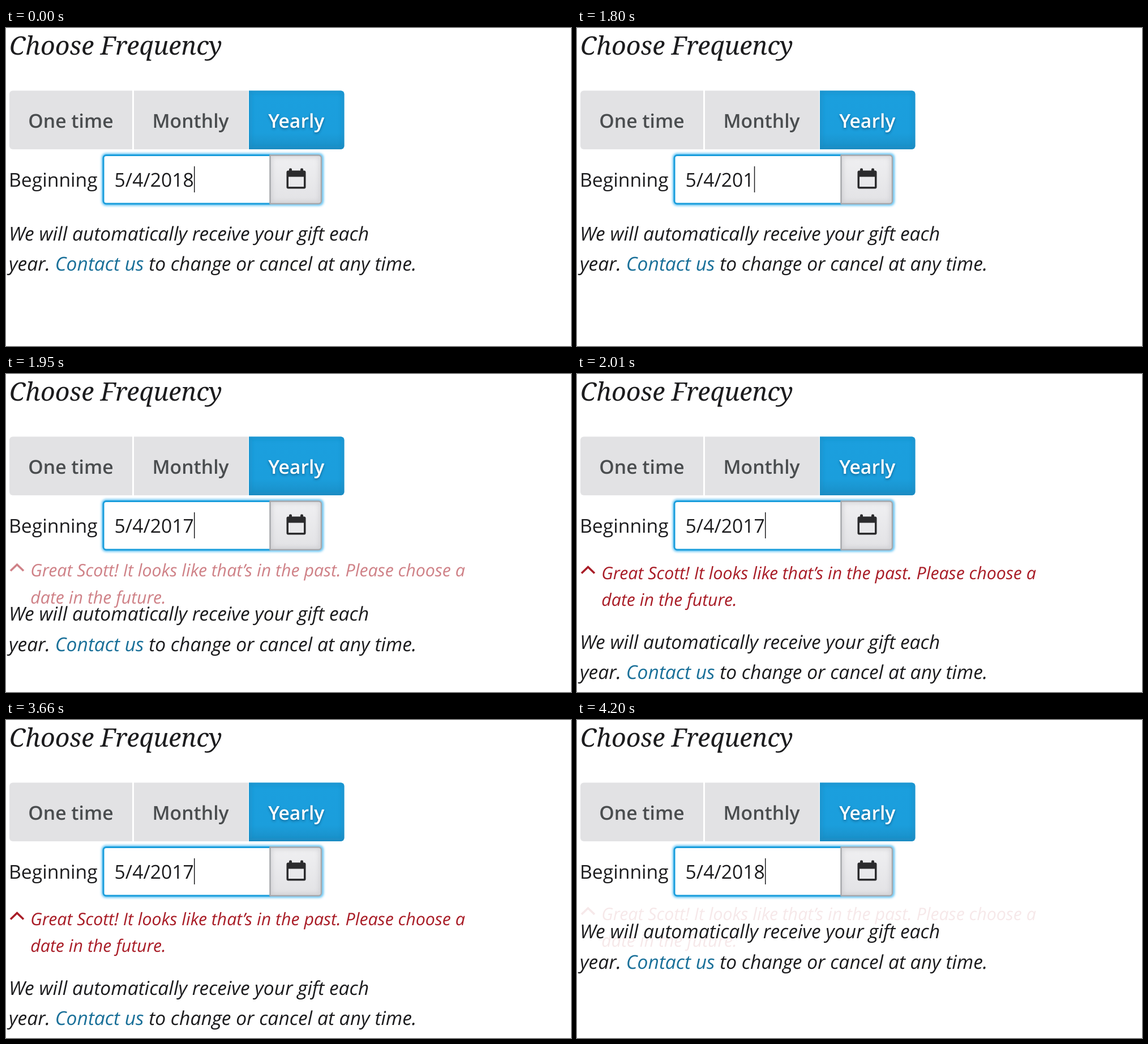
An HTML page for the animation above (4230 ms loop, 998 px wide and 561 px high).

```html
<!DOCTYPE html>
<html lang="en">
<head>
<meta charset="utf-8">
<title>Choose Frequency</title>
<style>
  html, body { margin: 0; width: 100%; height: 100%; overflow: hidden; background: #fff; }
  svg { display: block; width: 998px; height: 561px; }
  text { font: 33.7px "Open Sans", sans-serif; fill: #1c1c1e; white-space: pre; text-rendering: geometricPrecision; }
  .title { font: italic 44.8px "Noto Serif", serif; }
  .label { font-weight: 600; fill: #4a4d4f; }
  .active { fill: #fff; text-shadow: 0 2px 4px rgba(0, 30, 60, .45); }
  .note { font-style: italic; }
  .link { fill: #1a7099; }
  .error text { font-style: italic; font-size: 30.4px; fill: #a91d27; }
  .inset { fill: none; stroke-width: 6; filter: url(#soft); }
</style>
</head>
<body>
<svg viewBox="0 0 998 561">
  <defs>
    <linearGradient id="blue" x2="0" y2="1">
      <stop offset="0" stop-color="#1b9fde"/>
      <stop offset=".72" stop-color="#1b9edc"/>
      <stop offset="1" stop-color="#1a8fc7"/>
    </linearGradient>
    <linearGradient id="silver" x2="0" y2="1">
      <stop offset="0" stop-color="#f0f0f2"/>
      <stop offset="1" stop-color="#e2e2e5"/>
    </linearGradient>
    <filter id="glow" x="-10%" y="-20%" width="120%" height="140%">
      <feGaussianBlur stdDeviation="2"/>
    </filter>
    <filter id="soft" x="-10%" y="-20%" width="120%" height="140%">
      <feGaussianBlur stdDeviation="4"/>
    </filter>
    <path id="yearly" d="M429 110.5h162.500a6 6 0 0 1 6 6V208a6 6 0 0 1-6 6H429z"/>
    <path id="picker" d="M466.500 224.500H552a5 5 0 0 1 5 5v75.500a5 5 0 0 1-5 5h-85.500z"/>
    <clipPath id="inYearly"><use href="#yearly"/></clipPath>
    <clipPath id="inPicker"><use href="#picker"/></clipPath>
  </defs>

  <text class="title" x="6" y="47">Choose Frequency</text>

  <path d="M223 110.5H12a6 6 0 0 0-6 6V208a6 6 0 0 0 6 6h211z" fill="#e2e2e4"/>
  <path d="M226 110.5h202V214H226z" fill="#e2e2e4"/>
  <use href="#yearly" fill="url(#blue)"/>
  <g clip-path="url(#inYearly)"><use href="#yearly" class="inset" stroke="#1a86bb" stroke-opacity=".7"/></g>
  <text class="label" x="39.300" y="175.500">One time</text>
  <text class="label" x="258.500" y="175.500">Monthly</text>
  <text class="label active" x="463.200" y="175.500">Yearly</text>

  <text x="5" y="280">Beginning</text>
  <rect x="171.500" y="223.500" width="387" height="87.500" rx="5" fill="none" stroke="#35b2f0" stroke-width="4" filter="url(#glow)"/>
  <path d="M467 224.500H177a5 5 0 0 0-5 5v75.500a5 5 0 0 0 5 5h290" fill="#fff" stroke="#1b9edc" stroke-width="3"/>
  <use href="#picker" fill="url(#silver)"/>
  <g clip-path="url(#inPicker)"><use href="#picker" class="inset" stroke="#b8b8bd" stroke-opacity=".6"/></g>
  <use href="#picker" fill="none" stroke="#a6a8ac" stroke-width="2.500"/>
  <g fill="#2b2b2d" transform="translate(-.5 -.5)">
    <path fill-rule="evenodd" d="M499 252h28a3 3 0 0 1 3 3v26a3 3 0 0 1-3 3h-28a3 3 0 0 1-3-3v-26a3 3 0 0 1 3-3zM499.500 263v17.500h27V263z"/>
    <rect x="500.500" y="248" width="5" height="8" rx="2"/>
    <rect x="520.500" y="248" width="5" height="8" rx="2"/>
  </g>
  <text id="date" x="191.500" y="280"></text>
  <rect id="caret" y="244" width="1.500" height="46" fill="#1c1c1e"/>

  <g id="error" class="error">
    <path d="M8 351.500L19.500 340.500L31 351.500" fill="none" stroke="#a91d27" stroke-width="3.600"/>
    <text x="43.300" y="361.500">Great Scott! It looks like that’s in the past. Please choose a</text>
    <text x="43.300" y="409">date in the future.</text>
  </g>

  <g id="note">
    <text class="note" x="5" y="374.500">We will automatically receive your gift each</text>
    <text class="note" x="5" y="428.200">year. <tspan class="link">Contact us</tspan> to change or cancel at any time.</text>
  </g>
</svg>
<script>
  const LOOP = 4230, TICK = 30, SLIDE = 120;
  const SHOW_AT = 1886, HIDE_AT = 4104;
  const CARET_X = 312.8, DIGIT_WIDTH = 19.2;

  // [start ms, last digit of the year, caret visible]
  const states = [
    [0, "8", true], [450, "8", false], [900, "8", true], [1350, "8", false],
    [1680, "", false], [1800, "", true],
    [1890, "7", true], [2310, "7", false], [2760, "7", true], [3210, "7", false], [3660, "7", true],
    [3930, "", true], [4110, "8", true]
  ];

  const [date, caret, error, note] =
    ["date", "caret", "error", "note"].map(id => document.getElementById(id));

  const swing = x => 0.5 - Math.cos(Math.PI * Math.min(1, Math.max(0, x))) / 2;
  const moveY = (el, y) => el.setAttribute("transform", `translate(0 ${y.toFixed(2)})`);

  function draw(now) {
    const t = Math.floor(now % LOOP / TICK) * TICK;
    const [, digit, caretOn] = states.findLast(([start]) => t >= start);
    date.textContent = "5/4/201" + digit;
    caret.setAttribute("x", CARET_X + digit.length * DIGIT_WIDTH);
    caret.style.visibility = caretOn ? "visible" : "hidden";

    const shown = swing((t - SHOW_AT) / SLIDE) - swing((t - HIDE_AT) / SLIDE);
    error.style.opacity = shown;
    moveY(error, -9.5 * (1 - shown));
    moveY(note, 110 * shown);
  }

  const begin = performance.now();
  function frame() {
    draw(performance.now() - begin);
    requestAnimationFrame(frame);
  }
  frame();
</script>
</body>
</html>
```
